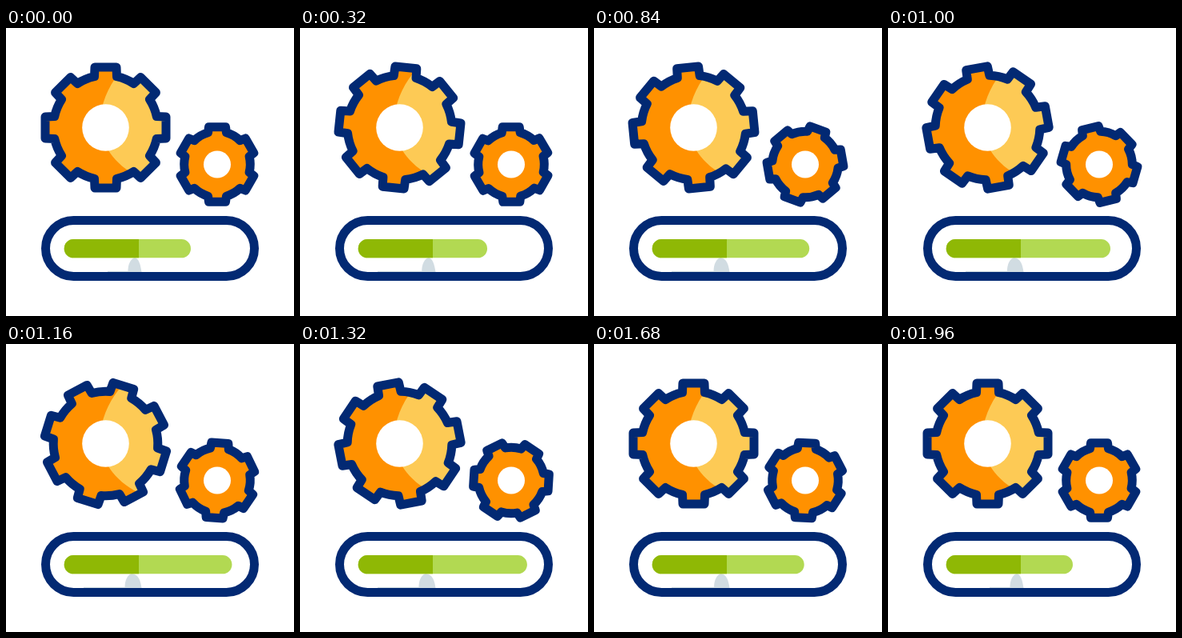
An HTML page with a canvas that plays this animation: 360x360 px, repeating every 2 s.

```html
<!DOCTYPE html>
<html lang="en">
<head>
<meta charset="utf-8">
<title>Gears and progress bar</title>
<style>
html, body { margin: 0; width: 100%; height: 100%; overflow: hidden; background: #fff; }
canvas { display: block; width: 360px; height: 360px; }
</style>
</head>
<body>
<canvas id="stage" width="360" height="360"></canvas>
<script>
const ctx = document.getElementById('stage').getContext('2d');
const LOOP = 2000, STEP = 40, TURN = Math.PI, POWER = 2.74;
const NAVY = '#022973', ORANGE = '#ff9100', YELLOW = '#fdca55';
const GREEN = '#8fb805', LIME = '#b2d952', GREY = '#d1dce2';

const big = { x: 124.5, y: 124.5, teeth: 8, tip: 75.5, root: 65.3, tipW: 13.5, baseW: 14, hole: 29.3 };
const small = { x: 264, y: 170.5, teeth: 6, tip: 46.8, root: 41.3, tipW: 10.5, baseW: 11.5, hole: 17 };

function ease(t, start, end) {
  const u = Math.min(1, Math.max(0, (t - start) / (end - start)));
  return u < 0.5 ? (2 * u) ** POWER / 2 : 1 - (2 - 2 * u) ** POWER / 2;
}

function gearPath(g, angle) {
  const path = new Path2D();
  const half = Math.asin(g.baseW / g.root);
  for (let i = 0; i < g.teeth; i++) {
    const a = angle + i * 2 * Math.PI / g.teeth;
    const c = Math.cos(a), s = Math.sin(a);
    // Tooth-local coordinates: r outward, w sideways
    const corner = (r, w) => path.lineTo(g.x + r * s + w * c, g.y - r * c + w * s);
    const r = g.root * Math.cos(half);
    corner(r, -g.baseW);
    corner(g.tip, -g.tipW);
    corner(g.tip, g.tipW);
    corner(r, g.baseW);
    const from = a + half - Math.PI / 2;
    path.arc(g.x, g.y, g.root, from, from + 2 * Math.PI / g.teeth - 2 * half);
  }
  path.closePath();
  return path;
}

function outline(path) {
  ctx.strokeStyle = NAVY;
  ctx.lineWidth = 11;
  ctx.lineJoin = 'round';
  ctx.stroke(path);
}

function drawGear(g, angle, shaded) {
  const path = gearPath(g, angle);
  ctx.fillStyle = ORANGE;
  ctx.fill(path);
  if (shaded) {
    ctx.save();
    ctx.clip(path);
    ctx.fillStyle = YELLOW;
    ctx.beginPath();
    ctx.moveTo(141, 57);
    ctx.bezierCurveTo(111, 95, 104, 150, 160, 183);
    ctx.lineTo(215, 205);
    ctx.lineTo(215, 40);
    ctx.lineTo(150, 40);
    ctx.fill();
    ctx.restore();
  }
  outline(path);
  ctx.fillStyle = '#fff';
  ctx.beginPath();
  ctx.arc(g.x, g.y, g.hole, 0, 2 * Math.PI);
  ctx.fill();
}

function pill(x, y, w, h) {
  const path = new Path2D();
  path.roundRect(x, y, w, h, h / 2);
  return path;
}

function drawBar(fill) {
  // Pale mark under the bar
  const dx = -4 * fill, left = 127 - 30 * Math.min(1, fill * 20);
  ctx.fillStyle = GREY;
  ctx.fillRect(left, 303.8, 168 - left, 1.4);
  ctx.beginPath();
  ctx.moveTo(152.5 + dx, 305);
  ctx.bezierCurveTo(152 + dx, 296, 156 + dx, 288, 161 + dx, 287);
  ctx.bezierCurveTo(166, 288, 168, 296, 169.5, 305);
  ctx.fill();

  outline(pill(49.5, 240.5, 261, 70));

  const bar = pill(72.7, 264, 158.3 + 53 * fill, 23.3);
  ctx.fillStyle = LIME;
  ctx.fill(bar);
  ctx.save();
  ctx.clip(bar);
  ctx.fillStyle = GREEN;
  ctx.fillRect(72, 264, 94, 24);
  ctx.restore();
}

function draw(t) {
  ctx.fillStyle = '#fff';
  ctx.fillRect(0, 0, 360, 360);
  drawGear(big, TURN * ease(t, 0, 1720), true);
  drawGear(small, -TURN * ease(t, 200, 1920), false);
  drawBar(ease(t, 0, 1410) - ease(t, 1440, 1960));
}

function tick() {
  const t = performance.now() % LOOP;
  draw(Math.floor(t / STEP) * STEP);
  requestAnimationFrame(tick);
}
tick();
</script>
</body>
</html>
```
